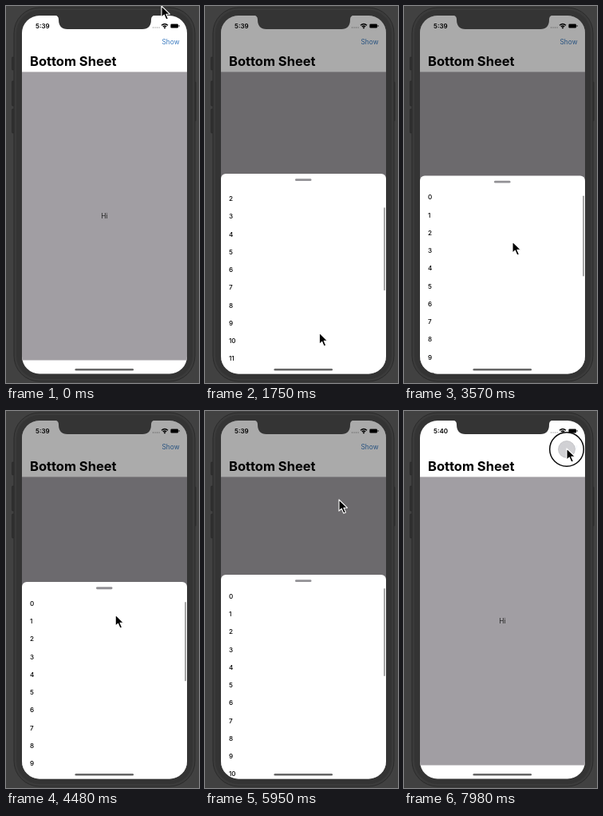
An HTML page for the animation above (8 s loop, 242x472 px).

```html
<!DOCTYPE html>
<html lang="en">
<head>
<meta charset="utf-8">
<title>Bottom Sheet</title>
<style>
html, body { margin: 0; width: 100%; height: 100%; overflow: hidden; background: #414141; }
svg { display: block; width: 242px; height: 472px; font-family: Inter, sans-serif; }
</style>
</head>
<body>
<svg viewBox="0 0 242 472">
  <defs>
    <clipPath id="screen"><rect x="20" y="12" width="207" height="448.5" rx="22"/></clipPath>
    <clipPath id="listArea"><rect x="20" y="16" width="207" height="300"/></clipPath>
  </defs>

  <!-- device -->
  <g fill="#303030" stroke="#262626" stroke-width=".6">
    <rect x="7.5" y="64" width="4" height="16" rx="1"/>
    <rect x="7.5" y="94" width="4" height="31" rx="1"/>
    <rect x="7.5" y="129" width="4" height="30" rx="1"/>
    <rect x="234" y="95" width="4" height="49" rx="1"/>
  </g>
  <rect x="10" y="2" width="227" height="468" rx="32" fill="#3b3b3b" stroke="#2b2b2b"/>
  <rect x="13" y="5" width="221" height="462" rx="29" fill="#343434"/>

  <g clip-path="url(#screen)">
    <rect x="20" y="12" width="207" height="449" fill="#fff"/>
    <rect x="20" y="82.5" width="207" height="361" fill="#a19ea3"/>
    <text id="clock" x="37" y="27.8" font-size="8" font-weight="600"></text>
    <g fill="#999">
      <circle cx="184.5" cy="27" r=".7"/><circle cx="187" cy="27" r=".7"/>
      <circle cx="189.5" cy="27" r=".7"/><circle cx="192" cy="27" r=".7"/>
    </g>
    <g fill="none" stroke="#000" stroke-width="1.4">
      <path d="M195 24.2Q199 20.6 203 24.2M196.8 26Q199 24 201.2 26"/>
      <circle cx="199" cy="27.3" r=".4"/>
    </g>
    <rect x="206.4" y="22.6" width="9.6" height="4.8" rx="1.2"/>
    <rect x="216.6" y="24" width=".9" height="2" rx=".4"/>
    <text id="show" x="195.5" y="48.3" font-size="8.4" fill="#3a7abf">Show</text>
    <text x="30" y="74.6" font-size="16.5" font-weight="700">Bottom Sheet</text>
    <text x="123.3" y="266" font-size="8.4" text-anchor="middle" fill="#222">Hi</text>
    <rect id="dim" x="20" y="12" width="207" height="449"/>

    <g id="sheet">
      <rect x="20" width="207" height="320" rx="6" fill="#fff"/>
      <rect x="113" y="6.3" width="20.5" height="2.8" rx="1.4" fill="#929195"/>
      <g clip-path="url(#listArea)"><g id="rows" font-size="8.1" font-weight="500"></g></g>
      <rect id="bar" x="224.2" width="1.6" rx=".8" fill="#909090"/>
    </g>
    <rect x="86.5" y="454" width="73.5" height="2.6" rx="1.3" fill="#666"/>
  </g>
  <path d="M61 11.5Q66 12 66 17Q66 29 77 29H171Q182 29 182 17Q182 12 187 11.5Z" fill="#343434"/>

  <g id="ring">
    <circle id="halo" fill="#fff" fill-opacity=".72" stroke="#0a0a0a" stroke-width="1.5"/>
    <circle r="10.5" fill="#c9c9cd" fill-opacity=".85" stroke="#b4b4b8" stroke-width=".6"/>
  </g>
  <path id="cursor" d="M0 0V14.2L3.3 11.2L5.8 17L8.4 15.9L5.9 10.2H10.4Z"
        stroke="#fff" stroke-width="1.1" stroke-linejoin="round"/>
</svg>

<script>
const LOOP = 8000, REST = 210, HIDDEN = 252, ROW = 22.25, ROWS = 20;
const $ = id => document.getElementById(id);

// Each key is [time, value, ...]
const pointer = [
  [0, 195, 0], [70, 195, 0], [350, 210, 45], [500, 210, 45], [620, 216, 90],
  [840, 212, 264], [1000, 185, 278], [1260, 150, 228], [1330, 150, 228],
  [1900, 142, 446], [2100, 140, 430], [2420, 130, 205], [2660, 127, 217],
  [2980, 127, 217], [3330, 136, 300], [3570, 136, 295], [3850, 136, 240],
  [4220, 138, 330], [4580, 137, 238], [4680, 137, 238], [4930, 138, 328],
  [5180, 137, 231], [5530, 146, 222], [5950, 168, 111], [6230, 148, 215],
  [6510, 148, 215], [6860, 152, 405], [7100, 158, 400], [7770, 204, 47], [8000, 204, 47]
];
const drag = [
  [0, HIDDEN], [530, HIDDEN], [800, 0], [2980, 0], [3330, 80], [3570, 2.5], [3680, 0],
  [3870, 0], [4220, 88], [4520, 0], [4690, 0], [4930, 86], [5160, 0], [5560, 0],
  [5800, -5.5], [5950, -5], [6200, 0], [6520, 0], [6860, 188], [7080, HIDDEN], [8000, HIDDEN]
];
const scroll = [
  [0, 10 * ROW], [1350, 10 * ROW], [1900, 0], [2050, -8], [2250, 0],
  [2420, 0], [2560, -9], [2660, -4.5], [2860, 0], [8000, 0]
];
const barFade = [[0, 0], [1330, 0], [1400, 1], [6250, 1], [6500, 0], [8000, 0]];

function at(keys, t) {
  let i = 1;
  while (i < keys.length - 1 && t > keys[i][0]) i++;
  const a = keys[i - 1], b = keys[i];
  const p = Math.min(1, (t - a[0]) / (b[0] - a[0]));
  const e = p * p * (3 - 2 * p);
  return a.slice(1).map((v, k) => v + (b[k + 1] - v) * e);
}

const set = (id, attrs) => {
  for (const k in attrs) $(id).setAttribute(k, attrs[k]);
};
const move = (id, x, y) => set(id, { transform: `translate(${x} ${y})` });

for (let i = 0; i < ROWS; i++) {
  const row = document.createElementNS("http://www.w3.org/2000/svg", "text");
  row.setAttribute("x", 30);
  row.setAttribute("y", 29.9 + i * ROW);
  row.textContent = i;
  $("rows").append(row);
}

function draw(t) {
  const [x, y] = at(pointer, t);
  const [d] = at(drag, t);
  const [s] = at(scroll, t);
  const up = Math.min(0, d), over = Math.max(0, -s);

  move("cursor", x, y);
  move("sheet", 0, REST + d);
  move("rows", 0, -s);
  set("dim", { opacity: 0.335 * Math.min(1, 1 - d / HIDDEN) });
  set("bar", {
    y: 25 + up * 1.6 + over * 0.45 + Math.max(0, s) * 0.43,
    height: Math.max(20, 104 - 1.2 * d - 1.33 * over),
    opacity: at(barFade, t)[0]
  });

  // Tap ring: holds, then grows and fades
  const first = t >= 490 && t < 680, second = t >= 7900;
  const grow = first ? Math.max(0, (t - 560) / 120) : 0;
  move("ring", first ? 210 : 204, first ? 45 : 48);
  set("ring", { opacity: first || second ? 1 - grow : 0 });
  set("halo", { r: 21.3 + 6 * grow });
  set("show", { opacity: first || second ? 0.3 : 1 });
  $("clock").textContent = t < 7100 ? "5:39" : "5:40";
}

function tick(now) {
  draw(now % LOOP);
  requestAnimationFrame(tick);
}
draw(0);
requestAnimationFrame(tick);
</script>
</body>
</html>
```
